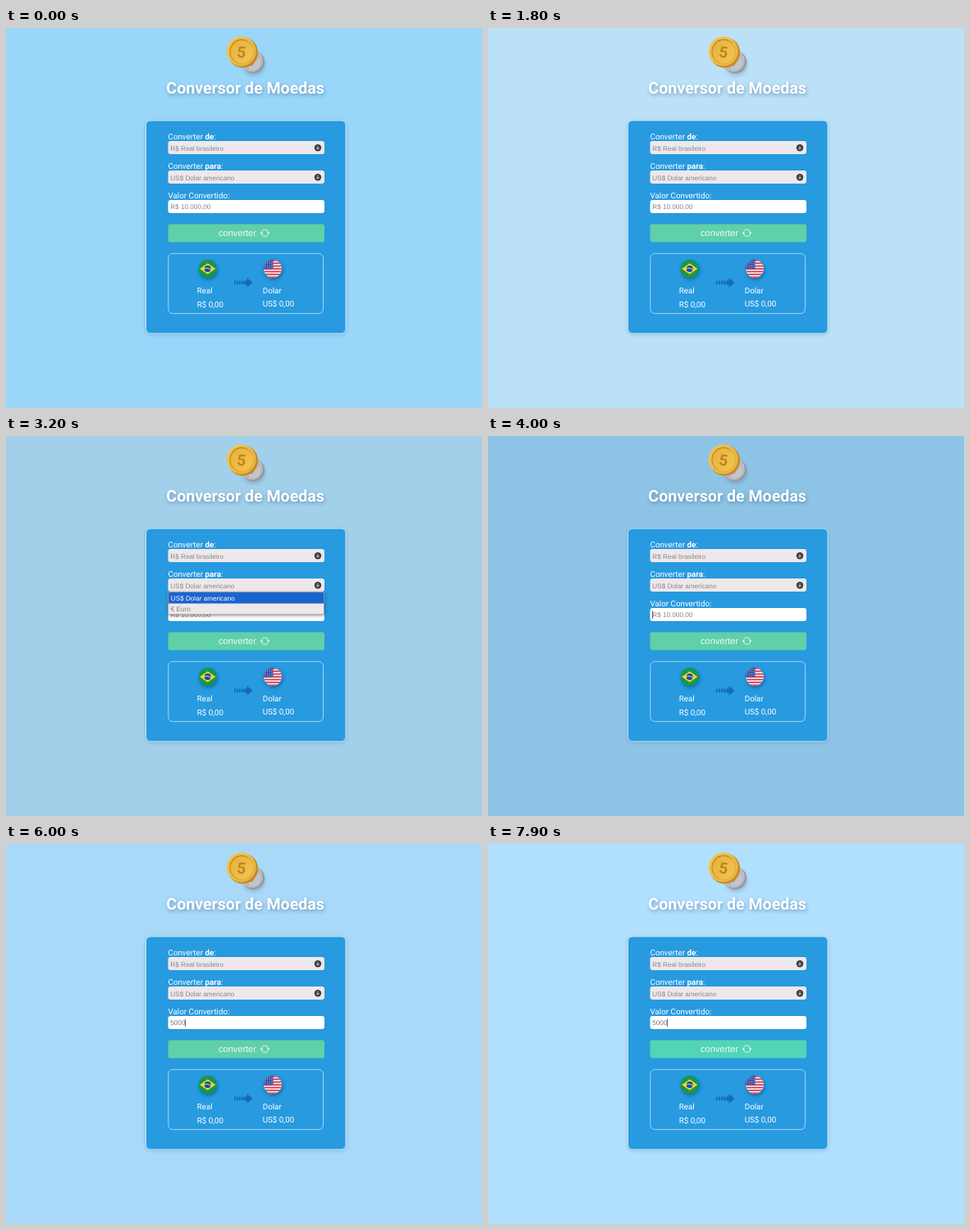
These frames come from a looping animation (580 by 464 pixels, 8000 ms). An HTML page with a canvas:

```html
<!DOCTYPE html>
<html lang="pt-BR">
<head>
<meta charset="utf-8">
<title>Conversor de Moedas</title>
<style>
html, body { margin: 0; width: 100%; height: 100%; overflow: hidden; }
canvas { display: block; width: 580px; height: 464px; }
</style>
</head>
<body>
<canvas id="stage" width="580" height="464"></canvas>
<script>
const ctx = document.getElementById('stage').getContext('2d');
const LOOP = 8000;
const ROBOTO = 'Roboto, sans-serif';
const ARIAL = '"Liberation Sans", Arial, sans-serif';
const SMALL = '8.17px ' + ARIAL;
const LABEL = '9.8px ' + ROBOTO;
const TAU = Math.PI * 2;

// time, r, g, b
const SKY = [
  [0, 153, 214, 250], [1500, 187, 226, 250], [2900, 170, 213, 238], [4000, 141, 196, 230],
  [5200, 165, 215, 247], [7000, 171, 218, 248], [7900, 177, 224, 254]
];
const MENU = { open: 2400, close: 3500 };
const KEYS = [[3800, ''], [4700, '5'], [4900, '50'], [5100, '500'], [5600, '5000']];

function slope(i, c) {
  const a = SKY[Math.max(i - 1, 0)], b = SKY[Math.min(i + 1, SKY.length - 1)];
  return (b[c] - a[c]) / (b[0] - a[0]);
}

// smooth curve through the sky colours
function skyColor(t) {
  let i = 0;
  while (i < SKY.length - 2 && t >= SKY[i + 1][0]) i++;
  const a = SKY[i], b = SKY[i + 1], d = b[0] - a[0];
  const u = Math.min((t - a[0]) / d, 1), v = 1 - u;
  const rgb = [1, 2, 3].map(c => Math.round(
    a[c] * (1 + 2 * u) * v * v + b[c] * u * u * (3 - 2 * u) +
    d * (slope(i, c) * u * v * v - slope(i + 1, c) * u * u * v)));
  return `rgb(${rgb})`;
}

function shadow(color, blur, x, y) {
  ctx.shadowColor = color;
  ctx.shadowBlur = blur;
  ctx.shadowOffsetX = x;
  ctx.shadowOffsetY = y;
}

function noShadow() { shadow('transparent', 0, 0, 0); }

function text(s, x, y, font, color) {
  ctx.font = font;
  ctx.fillStyle = color;
  ctx.fillText(s, x, y);
  return x + ctx.measureText(s).width;
}

function box(x, y, w, h, r, fill, stroke) {
  ctx.beginPath();
  ctx.roundRect(x, y, w, h, r);
  if (fill) { ctx.fillStyle = fill; ctx.fill(); }
  if (stroke) { ctx.strokeStyle = stroke; ctx.lineWidth = 1; ctx.stroke(); }
}

function oval(x, y, rx, ry, turn, fill) {
  ctx.beginPath();
  ctx.ellipse(x, y, rx, ry, turn, 0, TAU);
  ctx.fillStyle = fill;
  ctx.fill();
}

function poly(points, fill) {
  ctx.beginPath();
  points.forEach(([x, y]) => ctx.lineTo(x, y));
  ctx.closePath();
  ctx.fillStyle = fill;
  ctx.fill();
}

function ramp(x, y, r, from, to) {
  const g = ctx.createLinearGradient(x - r, y - r, x + r, y + r);
  g.addColorStop(0, from);
  g.addColorStop(1, to);
  return g;
}

function coin(x, y, r, c, sign, size) {
  oval(x + 1, y + .7, r, r, 0, c.edge);
  oval(x - .8, y - .8, r - .7, r - .5, 0, ramp(x, y, r, c.light, c.face));
  oval(x - .8, y - .8, r * .78, r * .8, 0, c.rim);
  oval(x - .2, y - .2, r * .74, r * .76, 0, ramp(x, y, r, c.face, c.light));
  ctx.save();
  ctx.translate(x - .5, y);
  ctx.rotate(.12);
  ctx.textAlign = 'center';
  const font = `bold ${size}px ${ROBOTO}`;
  text(sign, .8, size * .36 + .8, font, c.light);
  text(sign, 0, size * .36, font, c.ink);
  ctx.restore();
}

function coins() {
  shadow('rgba(60,90,130,.3)', 5, 1, 3);
  oval(301, 41.5, 13.5, 13.5, 0, '#a9abb3');
  noShadow();
  coin(300.5, 41, 13.7, { edge: '#9799a1', light: '#cccdd2', face: '#b5b6bd', rim: '#94969f', ink: '#8b8d97' }, '1', 13);
  coin(287.6, 29.3, 18.6, { edge: '#c48a24', light: '#f4c953', face: '#e5ae3b', rim: '#c38d2b', ink: '#c1821f' }, '5', 19);
}

function chevron(x, y) {
  oval(x, y, 4.2, 4.2, 0, '#3b3b3d');
  ctx.strokeStyle = '#d9d4d6';
  ctx.lineWidth = 1;
  ctx.beginPath();
  ctx.moveTo(x, y - 2.3);
  ctx.lineTo(x, y + 1.8);
  ctx.moveTo(x - 1.8, y + .2);
  ctx.lineTo(x, y + 2);
  ctx.lineTo(x + 1.8, y + .2);
  ctx.stroke();
}

function select(y, label) {
  box(197.5, y, 190.5, 16, 3, '#eee8ea');
  text(label, 200.3, y + 11.5, SMALL, '#88868a');
  chevron(380, y + 8.2);
}

function label(a, b, y) {
  const x = text(a, 197.5, y, LABEL, '#fff');
  if (b) text(':', text(b, x, y, 'bold ' + LABEL, '#fff'), y, LABEL, '#fff');
}

function refresh(x, y) {
  ctx.strokeStyle = '#e6faf2';
  ctx.lineWidth = 1;
  for (const turn of [0, Math.PI]) {
    ctx.save();
    ctx.translate(x, y);
    ctx.rotate(turn);
    ctx.beginPath();
    ctx.arc(0, 0, 4.1, Math.PI * 1.12, Math.PI * 1.95);
    ctx.stroke();
    poly([[2.3, -.8], [6, -.8], [4.2, 1.6]], '#e6faf2');
    ctx.restore();
  }
}

function badge(x, y, color, draw) {
  shadow('rgba(0,30,80,.45)', 5, 1, 2);
  oval(x, y, 11, 11, 0, color);
  noShadow();
  ctx.save();
  ctx.beginPath();
  ctx.arc(x, y, 11, 0, TAU);
  ctx.clip();
  ctx.translate(x, y);
  draw();
  ctx.restore();
}

function brazil() {
  poly([[-9.5, 0], [0, -6.7], [9.5, 0], [0, 6.7]], '#f6d32b');
  oval(0, 0, 3.9, 3.9, 0, '#164d9b');
  ctx.strokeStyle = '#e8eff5';
  ctx.lineWidth = .9;
  ctx.beginPath();
  ctx.arc(-1.2, 6, 6.8, -Math.PI * .65, -Math.PI * .2);
  ctx.stroke();
}

function usa() {
  ctx.fillStyle = '#d6394c';
  for (let i = 0; i < 7; i++) ctx.fillRect(-11, -11 + i * 3.4, 22, 1.7);
  ctx.fillStyle = '#3d4f9f';
  ctx.fillRect(-11, -11, 11.5, 11.6);
  ctx.fillStyle = '#dfe4f4';
  for (let r = 0; r < 4; r++)
    for (let c = 0; c < 4; c++) ctx.fillRect(-9.6 + c * 2.7, -9.2 + r * 2.6, .9, .9);
}

function arrow() {
  const blue = '#1768bd';
  ctx.fillStyle = blue;
  [[278, 1.8], [281, 1.8], [284, 2], [287.2, 2.2]].forEach(([x, w]) => ctx.fillRect(x, 308.7, w, 4.4));
  poly([[290.3, 308.6], [293.5, 308.6], [293.5, 305], [300.7, 310.9],
    [293.5, 316.8], [293.5, 313.2], [290.3, 313.2]], blue);
}

function menu() {
  shadow('rgba(0,0,0,.45)', 4, 0, 1);
  ctx.fillStyle = '#eee8ea';
  ctx.fillRect(197.5, 190.5, 190, 27.5);
  noShadow();
  ctx.fillStyle = '#1b64cf';
  ctx.fillRect(198, 191, 189, 13.5);
  text('US$ Dolar americano', 200.8, 200.5, SMALL, '#fff');
  text('€ Euro', 200.8, 214.2, SMALL, '#858387');
  ctx.strokeStyle = '#8b8b91';
  ctx.lineWidth = .7;
  ctx.strokeRect(197.7, 190.7, 189.8, 27.2);
}

function valueField(t) {
  box(197.5, 210, 190.5, 16, 3, '#fff');
  const key = KEYS.filter(k => t >= k[0]).pop();
  const value = key ? key[1] : '';
  const end = text(value || 'R$ 10.000,00', 200.3, 221.3, SMALL, value ? '#777' : '#858585');
  if (key && (t - key[0]) % 1000 < 500) {
    ctx.fillStyle = '#444';
    ctx.fillRect(value ? Math.round(end - .4) : 200, 213.5, .8, 9.5);
  }
}

function button(t) {
  const u = Math.max(0, Math.min((t - 7500) / 300, 1));
  const mix = (a, b) => Math.round(a + (b - a) * u);
  box(197.5, 239.5, 190.5, 22, 3, `rgb(${mix(95, 82)},${mix(208, 212)},${mix(168, 182)})`);
  text('converter', 259, 254, '11.02px ' + ARIAL, '#eefcf6');
  refresh(315.5, 250.3);
}

function draw(t) {
  ctx.fillStyle = skyColor(t);
  ctx.fillRect(0, 0, 580, 464);
  coins();

  shadow('rgba(40,80,125,.5)', 5, 1, 2);
  text('Conversor de Moedas', 195.3, 80.4, 'bold 19.6px ' + ROBOTO, '#fff');

  shadow('rgba(30,80,130,.3)', 5, 0, 1);
  box(170.5, 113, 243.5, 260, 5.5, '#279ae0');
  noShadow();
  box(170.5, 113, 243.5, 260, 5.5, null, 'rgba(225,243,255,.8)');

  label('Converter ', 'de', 136);
  select(138, 'R$ Real brasileiro');
  label('Converter ', 'para', 172);
  select(174, 'US$ Dolar americano');
  label('Valor Convertido:', '', 207.7);
  valueField(t);
  button(t);

  box(197.8, 275.4, 188.7, 73.2, 5.5, null, '#a3d6f5');
  badge(245.7, 294, '#17984a', brazil);
  badge(325, 294, '#f3eff3', usa);
  arrow();
  text('Real', 232.7, 324, LABEL, '#fff');
  text('R$ 0,00', 232.7, 340.7, LABEL, '#fff');
  text('Dolar', 312.7, 323.6, LABEL, '#fff');
  text('US$ 0,00', 312.7, 340.4, LABEL, '#fff');

  if (t >= MENU.open && t < MENU.close) menu();
}

ctx.textRendering = 'geometricPrecision';
const start = performance.now();
function tick() {
  const t = (performance.now() - start) % LOOP;
  draw(Math.floor(t / 100) * 100);
  requestAnimationFrame(tick);
}
tick();
</script>
</body>
</html>
```
